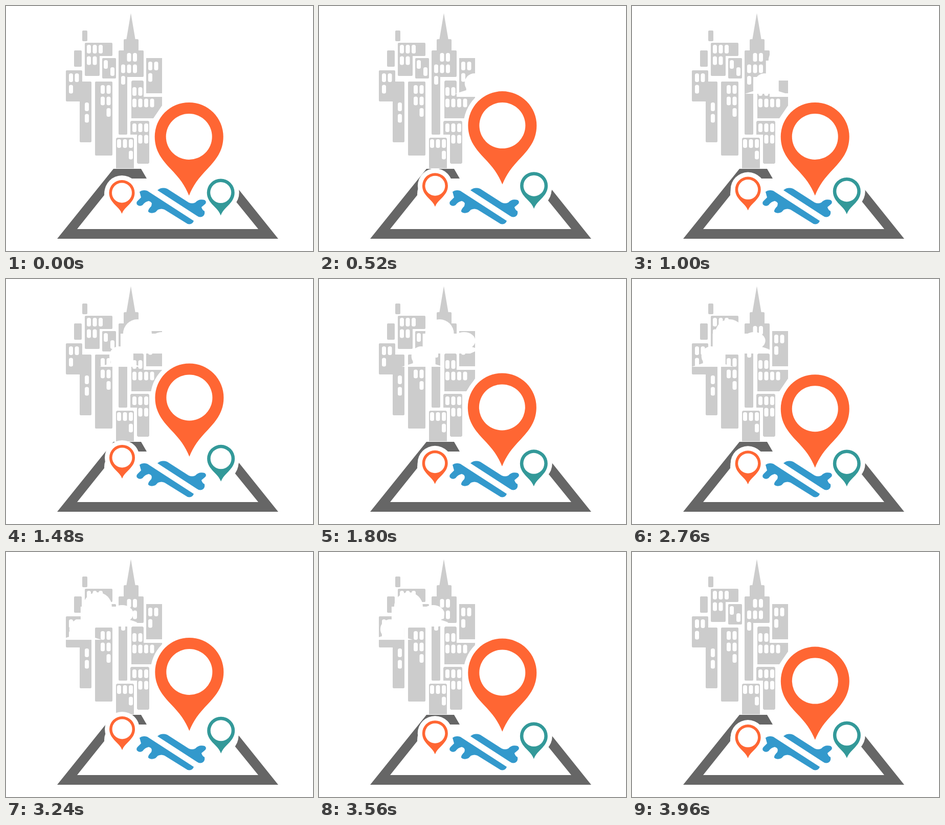
An HTML page for the animation above (4000 ms loop, 600x480 px).

```html
<!DOCTYPE html>
<html lang="en">
<head>
<meta charset="utf-8">
<title>City map pins</title>
<style>
html, body { margin: 0; width: 100%; height: 100%; overflow: hidden; background: #fff; }
svg { display: block; width: 600px; height: 480px; }
</style>
</head>
<body>
<svg viewBox="0 0 600 480">
  <!-- skyline -->
  <path fill="#ccc" stroke="#ccc" stroke-width="4" stroke-linejoin="round" d="
    M151 50h6v17h-6z M135 89h11v28h-11z M156 74h50v22h-25v39h-25z M190 104h23v36h-23z
    M119 128h28v22h18v115h-19v-80h-27z M176 150h30v141h-30z
    M232 67h25v22h10v48h-32v113h-13v-161h10z"/>
  <path fill="#ccc" d="M244 14L253 67H235Z M274 102h31v69h-31z M247 146h20l2 2v30h36v17l-17 25h-43v-72z
    M245 225h33l2 2v80l-2 2h-20l-2-2v-55h-13v-25z M217 258h31l2 2v58h-35v-58z"/>
  <g id="windows" fill="#fff"></g>

  <g id="cloud" fill="#fff">
    <circle cx="28" cy="107" r="28"/>
    <ellipse cx="76" cy="121" rx="22" ry="17"/>
    <circle cx="-8" cy="151" r="19"/>
    <path d="M12 107H80V130Q96 134 106 138L88 146H20V167L36 172H-46L-24 165V150H-5V107Z"/>
  </g>

  <!-- map -->
  <path fill="#666" d="M440 341L532 456H100L210 319H264L275 338H218L139 437H493L425 353Z"/>
  <circle cx="227" cy="368.5" r="35" fill="#fff"/>
  <circle cx="419" cy="360" r="35.5" fill="#fff"/>

  <g id="pins"></g>

  <path fill="#39c" d="M296 361Q304 354 315 358L357 385Q364 388 370 385Q377 377 388 380Q394 384 388 389L382 394
    Q383 399 388 402Q389 408 386 411Q380 416 373 411Z
    M261 364Q267 359 276 362L367 421Q364 429 355 427L310 399Q304 396 297 399L292 404
    Q283 408 278 403Q277 399 284 392Q287 384 279 382Q272 383 267 390Q261 394 256 389Q254 385 257 382L264 375Z"/>
</svg>
<script>
const LOOP = 4000, STEP = 40;

function add(parent, tag, attributes) {
  const node = document.createElementNS('http://www.w3.org/2000/svg', tag);
  for (const key in attributes) node.setAttribute(key, attributes[key]);
  return parent.appendChild(node);
}

// Rows of windows from the top down; a negative count aligns the row to the right of the first one
function addWindows(x, y, ...rows) {
  const layer = document.getElementById('windows');
  rows.forEach((count, row) => {
    const indent = count < 0 ? rows[0] + count : 0;
    for (let i = 0; i < Math.abs(count); i++)
      add(layer, 'rect', { x: x + (indent + i) * 11.5, y: y + row * 22.5, width: 8, height: 17, rx: 3.5 });
  });
}
addWindows(158, 76, 3, 2);
addWindows(123, 132, 2, 1);
addWindows(154, 189, 1, 1);
addWindows(191, 106, 1);
addWindows(204, 120, 1);
addWindows(185, 155, 2, 2, -1);
addWindows(225, 92, 3, 3, 1);
addWindows(278, 109, 2, 1);
addWindows(247, 159, 2, 4);
addWindows(247, 230, 3, -2);
addWindows(217, 261, 3, -1);
document.querySelector('#windows rect[x="225"][y="92"]').remove();

const pins = [
  { x: 357.7, y: 256, r: 67, ring: 22, tip: 115.5, color: '#f63', height: 25, period: 1000, lead: 0 },
  { x: 226.5, y: 366, r: 25, ring: 5.5, tip: 41, color: '#f63', height: 20, period: 1000, lead: 0.07 },
  { x: 419.7, y: 365.5, r: 27, ring: 6.5, tip: 45, color: '#399', height: 16, period: 967, lead: 0 }
];

function pinPath(r, tip) {
  const shoulder = 0.55 * r, waist = 0.27 * r, hip = 0.93 * r, bend = 1.22 * r, neck = tip - 0.3 * r;
  return `M${-r} 0A${r} ${r} 0 0 1 ${r} 0C${r} ${0.43 * r} ${0.77 * r} ${0.69 * r} ${shoulder} ${hip}` +
    `C${waist} ${bend} ${0.12 * r} ${neck} 0 ${tip}` +
    `C${-0.12 * r} ${neck} ${-waist} ${bend} ${-shoulder} ${hip}` +
    `C${-0.77 * r} ${0.69 * r} ${-r} ${0.43 * r} ${-r} 0Z`;
}

const pinLayer = document.getElementById('pins');
for (const pin of pins) {
  pin.node = add(pinLayer, 'g', {});
  add(pin.node, 'circle', { r: pin.r + 9, fill: '#fff' });
  add(pin.node, 'path', { d: pinPath(pin.r, pin.tip), fill: pin.color });
  add(pin.node, 'circle', { r: pin.r - pin.ring, fill: '#fff' });
}

// One high hop followed by a low rebound, as a fraction of the full height
function hop(phase) {
  const p = phase % 1;
  const arc = (peak, width) => 1 - ((p - peak) / width) ** 2;
  if (p < 0.4) return arc(0.4, 0.4);
  if (p < 0.74) return arc(0.4, 0.34);
  return 0.26 * arc(0.87, 0.13);
}

const cloud = document.getElementById('cloud');

function draw(now) {
  const t = Math.floor((now % LOOP) / STEP) * STEP;
  for (const { node, x, y, height, period, lead } of pins) {
    const lift = height * hop(t / period + lead * Math.min(1, t / 500));
    node.setAttribute('transform', `translate(${x + lift * 0.03} ${y - lift})`);
  }
  const cloudX = 146 + 1.54e-5 * Math.max(0, 3800 - t) ** 2;
  cloud.setAttribute('transform', `translate(${cloudX} 0)`);
  cloud.setAttribute('opacity', Math.max(0, Math.min(1, (3950 - t) / 300)));
}

const start = performance.now();
function tick() {
  draw(performance.now() - start);
  requestAnimationFrame(tick);
}
tick();
</script>
</body>
</html>
```
